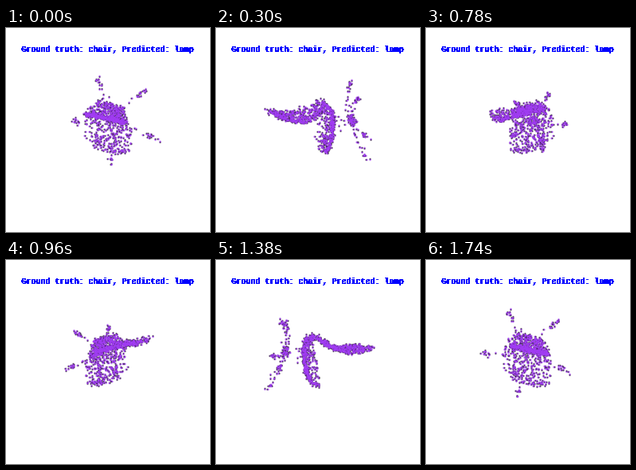
Recreate the animation shown at these times as a matplotlib script. Size 256 by 256 pixels, loop 1.8 s.

```python
import numpy as np
import matplotlib.pyplot as plt
from matplotlib.animation import FuncAnimation

SIZE, DPI = 256, 100
FRAMES, INTERVAL = 30, 60
CAMERA = 260
PURPLE, DARK = "#a03cf2", "#1c0a28"
PX = 72 / DPI

rng = np.random.default_rng(7)


def shell(n):
    """Backrest and seat: one bent sheet, swept sideways along its profile."""
    depth = [-66, -48, -28, -12, 0, 9, 15, 18, 17, 13, 8]
    height = [-22, -18, -16, -21, -30, -32, -26, -12, 4, 18, 27]
    width = [23, 27, 27, 24, 17, 15, 21, 27, 29, 27, 14]
    arc = np.r_[0, np.cumsum(np.hypot(np.diff(depth), np.diff(height)))]
    t = rng.uniform(0, arc[-1], 2 * n)
    side = rng.uniform(-29, 29, 2 * n)
    keep = np.abs(side) < np.interp(t, arc, width)
    t, side = t[keep][:n], side[keep][:n]
    d, y = np.interp(t, arc, depth), np.interp(t, arc, height)
    seat = np.clip((t - arc[5]) / 15, 0, 1)
    d -= 8 * seat * (side / 28) ** 2
    y += side * (0.21 + 0.03 * seat)
    pts = np.c_[side + 2 - 3 * seat, y, d]
    return pts + rng.normal(0, 1.2, pts.shape)


def leg(angle):
    """One spoke of the star base, with a caster at its tip."""
    r = np.r_[rng.uniform(5, 38, 9), rng.normal(42, 3, 11)]
    dx, dy = r * np.cos(angle), -r * np.sin(angle)
    d = 41 + 11 * (r / 45) ** 2 + 0.2 * dy
    pts = np.c_[dx - 1.3, dy - 12.8, d]
    return pts + rng.normal(0, 1.6, pts.shape)


def hub(n):
    """Column behind the seat and the knot where the spokes meet."""
    d = np.r_[rng.uniform(20, 38, n // 5), rng.normal(41, 2, n - n // 5)]
    return np.c_[rng.normal(-1, 4, n), rng.normal(-12, 4.5, n), d]


legs = [leg(np.radians(43 + 72 * i)) for i in range(5)]
cloud = np.vstack([shell(820), hub(45), *legs])
# Each dot shows its dark rim on one side
rim_shift = np.array([(1, 0), (-1, 0), (0, 1), (0, -1)])[
    rng.integers(0, 4, len(cloud))]


def project(k):
    phi = 2 * np.pi * (k + 1) / FRAMES
    a, y, d = cloud.T
    x = a * np.cos(phi) + d * np.sin(phi)
    z = d * np.cos(phi) - a * np.sin(phi)
    s = CAMERA / (CAMERA - z)
    return np.round(np.c_[128 + s * x, 128 + s * y])


fig = plt.figure(figsize=(SIZE / DPI, SIZE / DPI), dpi=DPI, facecolor="white")
ax = fig.add_axes([0, 0, 1, 1])
ax.set(xlim=(0, SIZE), ylim=(SIZE, 0))
ax.axis("off")


def dots(color):
    return ax.scatter([], [], s=(1.8 * PX) ** 2, c=color, marker="s",
                      linewidths=0, antialiased=False, snap=False)


rim, core = dots(DARK), dots(PURPLE)
# Doubled by one pixel for the heavy stroke of the title
for x in (19, 20):
    ax.text(x, 30, "Ground truth: chair, Predicted: lamp", color="blue",
            family="Liberation Mono", weight="bold", size=10 * PX,
            va="baseline", antialiased=False)


def draw(k):
    p = project(k)
    rim.set_offsets(p + rim_shift)
    core.set_offsets(p)
    return rim, core


anim = FuncAnimation(fig, draw, frames=FRAMES, interval=INTERVAL,
                     repeat=True, repeat_delay=0)
plt.show()
```
